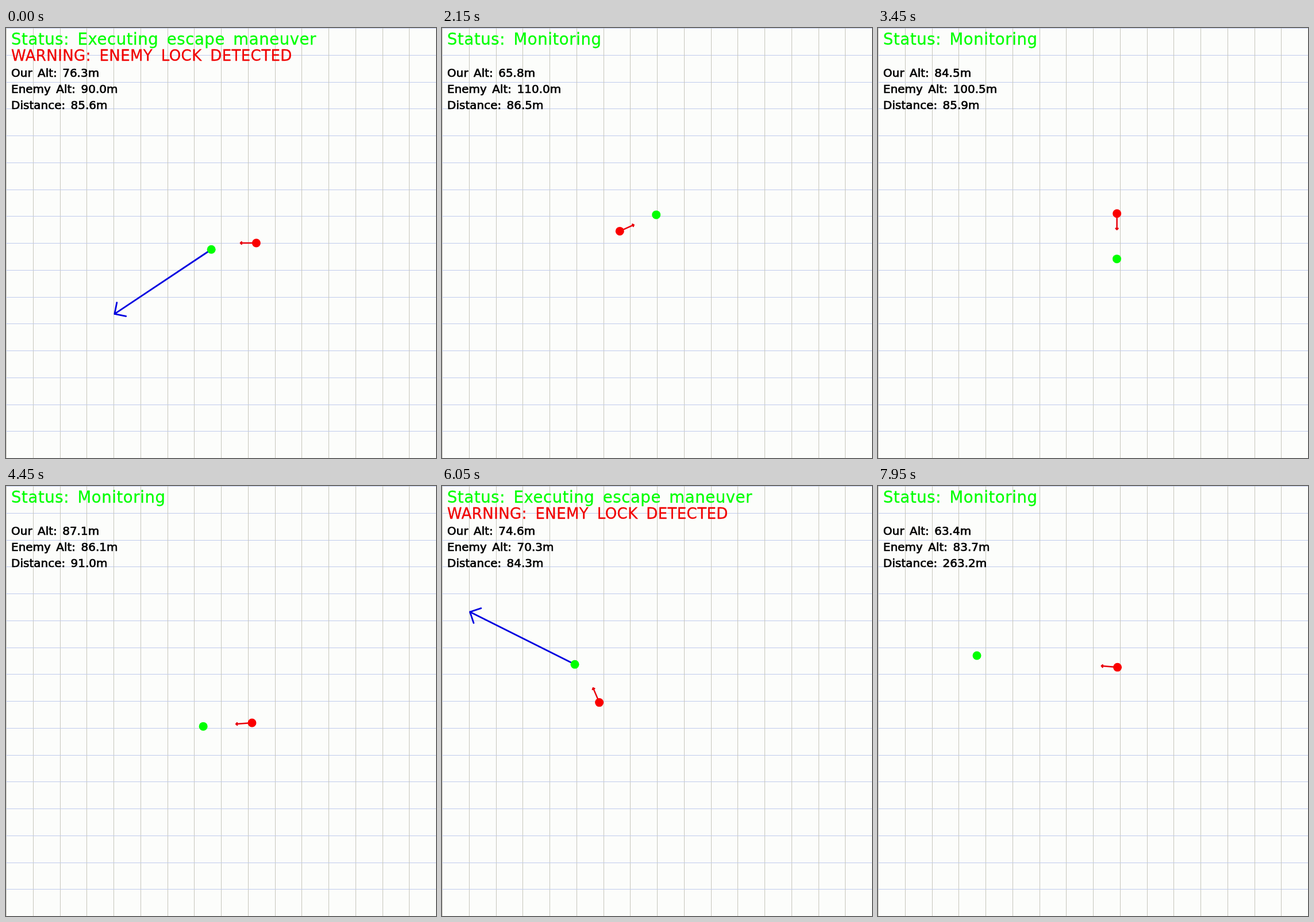
Write an HTML page with a canvas that moves like this. It is 748x748 px and loops after 8 s.

```html
<!DOCTYPE html>
<html lang="en">
<head>
<meta charset="utf-8">
<title>Escape maneuver</title>
<style>
  html, body { margin: 0; width: 100%; height: 100%; overflow: hidden; background: #fcfdfb; }
  canvas { display: block; }
</style>
</head>
<body>
<canvas id="stage" width="748" height="748"></canvas>
<script>
const ctx = document.getElementById('stage').getContext('2d');
const SIZE = 748, SCALE = 0.935, TICK = 50, TICKS = 160;
const START = { x: 0, y: 0, z: 80 };

// Our craft flees in equal jumps; on each leg every jump turns by the same angle (degrees)
const LEGS = [
  { from: 0, to: 0, jumps: 1, turn: 0, end: { x: -18, y: 12, z: 76.3 } },
  { from: 7, to: 20, jumps: 3, turn: 50, end: { x: -63.9, y: -4.8, z: 74 } },
  { from: 25, to: 25, jumps: 1, turn: 0, end: { x: -58.3, y: -25.7, z: 65.8 } },
  { from: 32, to: 41, jumps: 3, turn: 20, end: { x: -1.4, y: -52.5, z: 65.8 } },
  { from: 45, to: 66, jumps: 5, turn: 21.6, end: { x: 44.4, y: 29.6, z: 84.5 } },
  { from: 71, to: 102, jumps: 7, turn: 21, end: { x: -63.4, y: -6.8, z: 89 } },
  { from: 106, to: 106, jumps: 1, turn: 0, end: { x: -82.4, y: -17.6, z: 89.6 } },
  { from: 111, to: 130, jumps: 7, turn: -6, end: { x: -216, y: -84.5, z: 63.4 } }
];

function flyLeg(start, { from, to, jumps, turn, end }) {
  const dx = end.x - start.x, dy = end.y - start.y;
  const offsets = Array.from({ length: jumps }, (_, i) => (i - (jumps - 1) / 2) * turn * Math.PI / 180);
  const step = Math.hypot(dx, dy) / offsets.reduce((sum, a) => sum + Math.cos(a), 0);
  const heading = Math.atan2(dy, dx);
  let { x, y } = start;
  return offsets.map((offset, i) => {
    x += step * Math.cos(heading + offset);
    y += step * Math.sin(heading + offset);
    return {
      x, y,
      z: start.z + (end.z - start.z) * (i + 1) / jumps,
      tick: Math.round(from + (to - from) * i / Math.max(1, jumps - 1))
    };
  });
}
const jumps = LEGS.flatMap((leg, i) => flyLeg(i ? LEGS[i - 1].end : START, leg));

const toPixel = v => SIZE / 2 + v * SCALE;

function drawGrid() {
  ctx.fillStyle = '#fcfdfb';
  ctx.fillRect(0, 0, SIZE, SIZE);
  for (let i = 0; i < 16; i++) {
    const at = Math.round(i * SIZE / 16);
    ctx.fillStyle = '#c0cbec';
    ctx.fillRect(0, at, SIZE, 1);
    ctx.fillStyle = '#c6c6bc';
    ctx.fillRect(at, 0, 1, SIZE);
  }
}

function drawText(text, y, size, color, outline, letterGap, wordGap) {
  ctx.font = `${size}px "DejaVu Sans", sans-serif`;
  ctx.letterSpacing = letterGap + 'px';
  ctx.wordSpacing = wordGap + 'px';
  ctx.fillStyle = ctx.strokeStyle = color;
  ctx.lineWidth = outline;
  ctx.fillText(text, 9, y);
  ctx.strokeText(text, 9, y);
}

function drawDot(p, color) {
  ctx.fillStyle = color;
  ctx.beginPath();
  ctx.arc(toPixel(p.x), toPixel(p.y), 7.5, 0, 2 * Math.PI);
  ctx.fill();
}

function drawArrow(p, dx, dy, color, width) {
  const x = toPixel(p.x + dx), y = toPixel(p.y + dy);
  const barb = Math.hypot(dx, dy) * SCALE * 0.1;
  const angle = Math.atan2(dy, dx);
  ctx.strokeStyle = color;
  ctx.lineWidth = width;
  ctx.lineCap = ctx.lineJoin = 'round';
  ctx.beginPath();
  ctx.moveTo(toPixel(p.x), toPixel(p.y));
  ctx.lineTo(x, y);
  for (const turn of [-0.75, 0.75]) {
    const a = angle + turn * Math.PI;
    ctx.moveTo(x, y);
    ctx.lineTo(x + barb * Math.cos(a), y + barb * Math.sin(a));
  }
  ctx.stroke();
}

function drawTick(n) {
  const index = jumps.findLastIndex(j => j.tick <= n);
  const us = jumps[index];
  const before = jumps[index - 1] || START;
  const locked = us.tick === n;
  const seen = locked ? before : us;

  // The enemy circles at 100 m and leans 35 m toward the position it sees
  const phase = n * 0.075;
  const orbit = { x: 100 * Math.cos(phase), y: 100 * Math.sin(phase) };
  const range = Math.hypot(seen.x - orbit.x, seen.y - orbit.y, seen.z - 100);
  const aimX = (seen.x - orbit.x) / range, aimY = (seen.y - orbit.y) / range;
  const enemy = {
    x: orbit.x + 35 * aimX,
    y: orbit.y + 35 * aimY,
    z: 90 + 20 * Math.sin(phase / 2)
  };
  const distance = Math.hypot(enemy.x - us.x, enemy.y - us.y, enemy.z - us.z);

  drawGrid();
  if (locked) drawArrow(us, 10 * (us.x - before.x), 10 * (us.y - before.y), '#0000e0', 2.8);
  drawDot(us, '#00ff00');
  drawArrow(enemy, 30 * aimX, 30 * aimY, '#e8000c', 2.5);
  drawDot(enemy, '#fa0000');

  const status = locked ? 'Executing escape maneuver' : 'Monitoring';
  drawText('Status: ' + status, 28.5, 27.5, '#00ff00', 0.3, 0.6, 5);
  if (locked) drawText('WARNING: ENEMY LOCK DETECTED', 56.5, 26, '#f00000', 0.3, 0.4, 6);
  const readings = [['Our Alt', us.z], ['Enemy Alt', enemy.z], ['Distance', distance]];
  readings.forEach(([label, value], i) =>
    drawText(`${label}: ${value.toFixed(1)}m`, 85 + 28 * i, 20, '#000', 0.7, 0, 3));
}

function play(now) {
  drawTick(Math.floor(now / TICK) % TICKS);
  requestAnimationFrame(play);
}
drawTick(0);
requestAnimationFrame(play);
</script>
</body>
</html>
```
